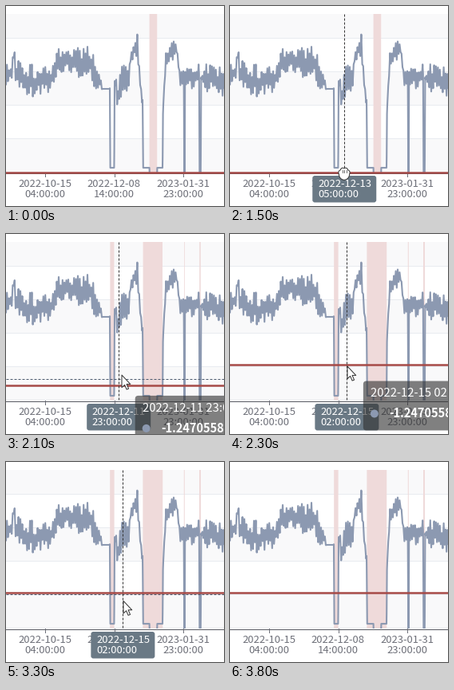
A matplotlib script for the animation above (4 s loop, 273 px wide and 251 px high).

```python
import numpy as np
import matplotlib.pyplot as plt
from matplotlib.animation import FuncAnimation
from matplotlib.patches import Circle, FancyBboxPatch, Polygon, Rectangle

W, H, DPI = 273, 251, 64
FRAMES, STEP = 40, 100
TOP, BASE = 10, 209
SPLIT = 42  # distance between grid lines
PT = 72 / DPI  # points per pixel
FONT = "Noto Sans CJK JP"
GREY, STEEL = "#6e7079", "#8c99b1"
ROWS = (227, 240)  # baselines of the two label rows

fig = plt.figure(figsize=(W / DPI, H / DPI), dpi=DPI, facecolor="white")
ax = fig.add_axes([0, 0, 1, 1])
ax.set_xlim(0, W)
ax.set_ylim(H, 0)
ax.axis("off")


def line(xs, ys, color, width, z, **kw):
    return ax.plot(xs, ys, color=color, lw=width * PT, zorder=z, **kw)[0]


def text(x, y, s, size, color, z, **kw):
    return ax.text(x, y, s, fontsize=size * PT, color=color, zorder=z,
                   family=FONT, va="baseline", **kw)


def rect(x, y, w, h, color, z, **kw):
    return ax.add_patch(Rectangle((x, y), w, h, fc=color, ec="none",
                                  zorder=z, **kw))


def box(x, y, w, h, color, z, radius, alpha=1):
    style = f"round,pad=0,rounding_size={radius}"
    return ax.add_patch(FancyBboxPatch((x, y), w, h, boxstyle=style, fc=color,
                                       ec="none", alpha=alpha, zorder=z))


def ramp(i, start, stop):
    return min(max((i - start) / (stop - start), 0), 1)


# ---- series: a zigzag around a trend, cut by outages ----------------------
TREND = np.array([  # x, middle, half height
    (7, 86, 15), (9, 58, 15), (12, 83, 15), (30, 94, 23), (60, 92, 18),
    (65, 70, 17), (86, 69, 17), (104, 74, 24), (118, 92, 15), (121, 104, 0),
    (130, 104, 0), (136, 90, 10), (140, 117, 14), (146, 82, 28),
    (152, 98, 18), (156, 66, 24), (164, 48, 20), (170, 118, 4),
    (197, 126, 4), (200, 66, 12), (214, 53, 13), (217, 86, 15),
    (273, 94, 20)])
OUTAGES = [  # start, end, depth, width of the slopes
    (129.5, 136.5, 203, 1), (170.2, 197.6, 203, 1.5),
    (178.8, 190.2, 212, 1), (222.4, 224.5, 208.5, 0.7),
    (241.5, 244.7, 208.5, 0.8)]


def make_series():
    rng = np.random.default_rng(5)
    knots = np.arange(0, W + 3, 1.2)
    mid, half = (np.interp(knots, TREND[:, 0], TREND[:, k]) for k in (1, 2))
    sign = 1 - 2 * (np.arange(len(knots)) % 2)
    zigzag = mid + half * sign * rng.uniform(0.1, 1, len(knots))
    x = np.arange(0, W + 1, 0.2)
    y = np.interp(x, knots, zigzag)
    for a, b, depth, slope in OUTAGES:
        well = np.interp(x, [a, a + slope, b - slope, b], [0, depth, depth, 0])
        y = np.maximum(y, well)
    return x, y


sx, sy = make_series()

# ---- static chart ---------------------------------------------------------
for k in range(5):
    y = BASE - 1 - SPLIT * k
    if k % 2 == 0:
        top = max(y - SPLIT, TOP)
        rect(0, top, W, y - top, "#f9f9fa", 0)
    line([0, W], [y - 0.5] * 2, "#e9ebf0", 1, 1)
curve = line(sx, sy, STEEL, 2.1, 3, solid_joinstyle="round")
curve.set_clip_path(Rectangle((0, TOP), W, BASE - TOP,
                              transform=ax.transData))
line([0, W], [BASE + 0.5] * 2, "#55575f", 1, 2)
for k, label in enumerate(["2022-10-15 04:00:00", "2022-12-08 14:00:00",
                           "2023-01-31 23:00:00"]):
    x = 49 + 86.5 * k
    line([x, x], [BASE, BASE + 5], GREY, 1, 2)
    for row, part in zip(ROWS, label.split()):
        text(x - 0.3, row, part, 13, GREY, 2, ha="center")

# ---- moving parts ---------------------------------------------------------
limit = line([0, W], [0, 0], "#a64a47", 2.5, 4)
dashes = dict(dashes=(3, 2), dash_capstyle="butt")
cross_x = line([0, 0], [TOP, BASE], "#333333", 1, 5, **dashes)
cross_y = line([0, W], [0, 0], "#4c5a6e", 1, 3.9, **dashes)

tag = box(0, 213, 80, 33.5, "#6a7985", 6, 3)
tag_rows = [text(0, row, "", 13, "white", 6.1) for row in ROWS]

tip = box(0, 0, 190, 62, "#323232", 7, 4, alpha=0.62)
tip_dot = ax.add_patch(Circle((0, 0), 5, fc=STEEL, ec="none", zorder=7.1))
tip_title = text(0, 0, "", 14.8, "white", 7.1)
tip_value = text(0, 0, "-1.24705582", 14.6, "white", 7.1, weight="bold")

ARROW = 0.95 * np.array([(0, 0), (0, 16.5), (3.8, 13), (6.4, 19), (9, 18),
                         (6.4, 12), (11.3, 12)])
turn = np.linspace(0, 2 * np.pi, 60, endpoint=False)
knuckles = 6.6 + 0.9 * np.abs(np.sin(4 * turn)) * (np.sin(turn) < 0)
HAND = np.column_stack([knuckles * np.cos(turn),
                        1 + 1.1 * knuckles * np.sin(turn)])
cursor = ax.add_patch(Polygon(ARROW, closed=True, fc="white", ec="#333333",
                              lw=PT, joinstyle="round", zorder=8))
fingers = [line([0, 0], [0, 0], "#444444", 0.8, 8.1) for _ in range(3)]

TAG_PARTS = (cross_x, cross_y, tag, *tag_rows)
TIP_PARTS = (tip, tip_dot, tip_title, tip_value)
ORIGIN = np.datetime64("2022-12-08T14:00:00")
bands = []


def show(parts, on):
    for part in parts:
        part.set_visible(on)


def shade(level):
    """Mark the spans where the series lies below the limit."""
    while bands:
        bands.pop().remove()
    edges = np.flatnonzero(np.diff((sy > level).astype(int)))
    for a, b in zip(edges[::2], edges[1::2]):
        bands.append(rect(sx[a], TOP, sx[b] - sx[a], BASE - TOP, "#efdada",
                          1.5, snap=False))


def place_tag(i):
    hours = round(111 - 30 * ramp(i, 19, 21) + 75 * ramp(i, 21, 23))
    x = 135.6 + hours / 14.5
    y = 210 - 46 * ramp(i, 18, 23) + 17 * max(0, i - 32.9)
    stamp = str(ORIGIN + np.timedelta64(hours, "h")).split("T")
    cross_x.set_xdata([x, x])
    cross_y.set_ydata([y, y])
    tag.set_x(x - 40)
    for row, part in zip(tag_rows, stamp):
        row.set(x=x - 33.3, text=part)
    return x, y, " ".join(stamp)


def place_tip(x, y, title):
    x, y = x + 20.5, y + 20.5
    tip.set_x(x)
    tip.set_y(y)
    tip_dot.center = (x + 14, y + 41)
    tip_title.set(x=x + 9, y=y + 20, text=title)
    tip_value.set(x=x + 32.5, y=y + 46)


def place_cursor(i):
    x = 149 - 6 * ramp(i, 3, 13) + 4 * ramp(i, 19, 23)
    y = (249 - 39 * ramp(i, 3, 13) - 44 * ramp(i, 18, 22)
         + 75 * ramp(i, 32.5, 37))
    grab = 13 <= i <= 20
    cursor.set_xy((HAND if grab else ARROW) + (x, y))
    show(fingers, grab)
    for k, finger in enumerate(fingers):
        fx = x - 2.5 + 2.5 * k
        finger.set_data([fx, fx], [y - 4.5, y - 1.5])


def update(i):
    level = 209.3 - 45.3 * ramp(i, 18, 23) ** 1.7
    limit.set_ydata([level, level])
    shade(level)

    show(TAG_PARTS, 15 <= i <= 35)
    show(TIP_PARTS, 20 <= i <= 28)
    place_tip(*place_tag(i))

    place_cursor(i)
    cursor.set_visible(3 <= i <= 37)
    return []


anim = FuncAnimation(fig, update, frames=FRAMES, interval=STEP,
                     init_func=lambda: [], repeat=True, repeat_delay=0)
plt.show()
```
